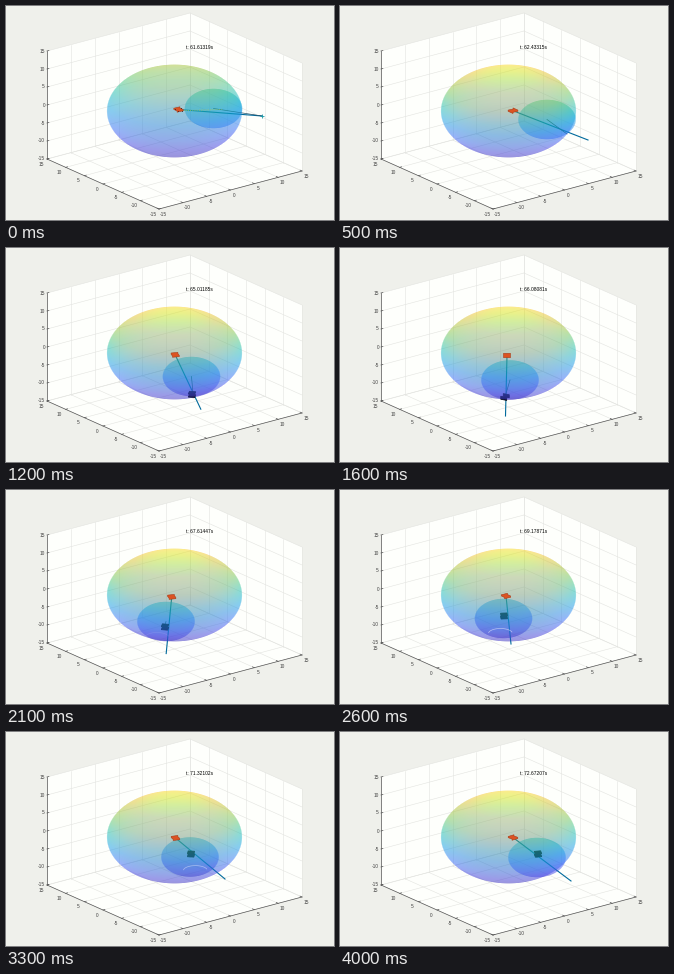
A matplotlib script for the animation above (4100 ms loop, 328 by 214 pixels).

```python
import numpy as np
import matplotlib.pyplot as plt
from matplotlib.animation import FuncAnimation
from matplotlib.colors import LinearSegmentedColormap
from matplotlib.patches import Polygon

W, H, DPI = 328, 214, 100
FRAMES, STEP = 41, 100
CX, CY = 168.5, 105.0        # screen position of the origin
SU, SV = 6.05, 4.164         # pixels per unit across and up
R, R_IN = 11.15, 4.75
ALPHA = 0.31
LIM = 15
COS, SIN = np.cos(np.pi / 6), np.sin(np.pi / 6)

PARULA = LinearSegmentedColormap.from_list("parula", [
    (0.00, (0.242, 0.150, 0.660)), (0.20, (0.281, 0.323, 0.958)),
    (0.33, (0.179, 0.529, 0.968)), (0.48, (0.069, 0.695, 0.839)),
    (0.60, (0.216, 0.784, 0.592)), (0.75, (0.672, 0.779, 0.223)),
    (0.90, (0.997, 0.766, 0.220)), (1.00, (0.977, 0.984, 0.081))])

# Rows of frame, x, y
INNER = np.array([(1, 207.5, 102.5), (5, 207, 113.5), (9, 197, 123.5),
                  (16, 170, 132), (21, 160, 131.5), (26, 163.5, 128.5),
                  (33, 184, 125), (40, 197, 125.5)])
TIP = np.array([(1, 256, 110), (5, 248, 134), (9, 219, 154), (13, 187, 163),
                (16, 165.5, 168), (20, 160, 165), (26, 171, 154),
                (33, 219, 147), (40, 231, 149)])
HUB = np.array([(1, 172.5, 103.5), (5, 173, 104.7), (9, 171, 106),
                (16, 167, 107.5), (26, 166, 106), (33, 169.5, 106),
                (40, 173, 105.5)])
CRAFT = np.array([(8, 275, 128), (9, 228, 137), (11, 197, 144), (16, 165, 149),
                  (21, 159, 137), (26, 164, 126), (33, 185, 122),
                  (40, 198, 122)])
SHORT = np.array([(1, 256, 110), (5, 227, 128), (9, 206, 140), (16, 165, 149),
                  (26, 164, 126), (33, 185, 122), (40, 198, 122)])
YAW = np.array([(1, 0.3), (5, 0.0), (9, 0.35), (16, 0.78), (26, 0.3),
                (33, 0.5), (40, 0.2)])
CLOCK = np.array([(1, 61.613186), (5, 62.433145), (9, 64.084064),
                  (16, 66.080806), (26, 69.178715), (33, 71.321024),
                  (40, 72.672074)])


def spline(keys, k):
    """Smooth value at frame k through the key rows."""
    t, p = keys[:, 0], keys[:, 1:]
    m = np.gradient(p, t, axis=0)
    k = np.clip(k, t[0], t[-1])
    i = min(np.searchsorted(t, k, side="right") - 1, len(t) - 2)
    h = t[i + 1] - t[i]
    s = (k - t[i]) / h
    return ((2*s**3 - 3*s**2 + 1) * p[i] + (s**3 - 2*s**2 + s) * h * m[i]
            + (3*s**2 - 2*s**3) * p[i + 1] + (s**3 - s**2) * h * m[i + 1])


def project(x, y, z):
    return (CX + 4.767*x - 3.733*y, CY - 1.267*x - 1.667*y - 3.6*z)


PX, PY = np.meshgrid(np.arange(W) + 0.5, np.arange(H) + 0.5)
U, V = (PX - CX) / SU, (CY - PY) / SV


def shell(center, radius, top):
    """Back and front half of a see-through sphere as RGBA layers."""
    cu, cv, cd = center
    rho = np.hypot(U - cu, V - cv)
    depth = np.sqrt(np.maximum(radius**2 - rho**2, 0))
    cover = np.clip((radius - rho) * 5 + 0.5, 0, 1) * ALPHA
    halves = []
    for side in (-1, 1):
        z = V * COS + (cd + side * depth) * SIN
        rgba = PARULA(np.clip((z + R) / (top + R), 0, 1))
        rgba[..., 3] = cover
        halves.append(rgba)
    return halves


def over(low, high):
    """Composite one RGBA layer over another."""
    a, b = low[..., 3:], high[..., 3:]
    total = b + a * (1 - b)
    rgb = high[..., :3] * b + low[..., :3] * a * (1 - b)
    return np.concatenate([rgb / np.maximum(total, 1e-6), total], axis=2)


def plate(center, yaw, half, thick):
    """Outline of a small flat square seen from above at a slant."""
    a = yaw + np.arange(4) * np.pi / 2
    x, y = half * np.cos(a), 0.45 * half * np.sin(a)
    pts = np.vstack([np.c_[x, y - thick], np.c_[x, y + thick]])
    order = np.argsort(np.arctan2(pts[:, 1], pts[:, 0]))
    return pts[order] + center


fig = plt.figure(figsize=(W / DPI, H / DPI), dpi=DPI, facecolor="#eff0eb")
ax = fig.add_axes([0, 0, 1, 1])
ax.set_xlim(0, W)
ax.set_ylim(H, 0)
ax.axis("off")


def segment(a, b, **style):
    (x0, y0), (x1, y1) = project(*a), project(*b)
    ax.plot([x0, x1], [y0, y1], **style)


def label(x, y, value, ha="center"):
    ax.text(x, y, str(value), fontsize=3.4, color="#404040", ha=ha,
            va="center", family="Liberation Sans")


def draw_box():
    L = LIM
    outline = [(-L, -L, -L), (L, -L, -L), (L, -L, L), (L, L, L),
               (-L, L, L), (-L, L, -L)]
    ax.add_patch(Polygon([project(*p) for p in outline], fc="#fefffc",
                         ec="none", zorder=0))
    grid = dict(color="#e3e4e0", lw=0.4, zorder=1)
    for t in range(-L, L + 1, 5):
        segment((t, -L, -L), (t, L, -L), **grid)
        segment((t, L, -L), (t, L, L), **grid)
        segment((-L, t, -L), (L, t, -L), **grid)
        segment((L, t, -L), (L, t, L), **grid)
        segment((-L, L, t), (L, L, t), **grid)
        segment((L, -L, t), (L, L, t), **grid)
    edge = dict(color="#555555", lw=0.5, zorder=2)
    segment((-L, -L, -L), (L, -L, -L), **edge)
    segment((-L, -L, -L), (-L, L, -L), **edge)
    segment((-L, L, -L), (-L, L, L), **edge)
    for t in range(-L, L + 1, 5):
        segment((t, -L, -L), (t, -L + 0.5, -L), **edge)
        segment((-L, t, -L), (-L + 0.4, t, -L), **edge)
        segment((-L, L, t), (-L + 0.4, L, t), **edge)
        x, y = project(t, -L, -L)
        label(x + 4, y + 5, t)
        x, y = project(-L, t, -L)
        label(x - 6, y + 5, t)
        x, y = project(-L, L, t)
        label(x - 2, y, t, ha="right")


draw_box()
blank = np.zeros((H, W, 4))
view = dict(extent=(0, W, H, 0), interpolation="nearest", aspect="auto")
behind = ax.imshow(blank, zorder=3, **view)
front = ax.imshow(blank, zorder=6, **view)
trail, = ax.plot([], [], color="#f0f0ff", lw=0.5, zorder=7)
beam, = ax.plot([], [], color="#006a9c", lw=0.8, zorder=5)
short, = ax.plot([], [], color="#20506a", lw=0.5, zorder=5)
glow, = ax.plot([], [], color="#a8c850", lw=0.6, ls=":", zorder=7)
cross, = ax.plot([], [], "+", color="#1a9aa8", ms=2.2, mew=0.6, zorder=7)
craft = Polygon(np.zeros((3, 2)), fc="#0a0f22", ec="#05060f", lw=0.5, zorder=5)
hub = Polygon(np.zeros((3, 2)), fc="#dc5322", ec="#a83c18", lw=0.4, zorder=8)
specks, = ax.plot([], [], ".", color="#3a2020", ms=1.2, mew=0, zorder=9)
ax.add_patch(craft)
ax.add_patch(hub)
clock = ax.text(179.5, 41, "", fontsize=3.5, va="center", color="black",
                family="Liberation Sans", zorder=9)
ax.set_xlim(0, W)
ax.set_ylim(H, 0)


def update(i):
    k = max(i, 1)
    ball, tip, core = spline(INNER, k), spline(TIP, k), spline(HUB, k)
    pod, yaw = spline(CRAFT, k), spline(YAW, k)[0]

    # The small sphere rolls along the inside of the large one
    u, v = (ball[0] - CX) / SU, (CY - ball[1]) / SV
    depth = -np.sqrt(max((R - R_IN)**2 - u*u - v*v, 0))
    top = R + 5.5 * max(0, 1 - (k - 1) / 4)
    big_back, big_front = shell((0, 0, 0), R, top)
    in_back, in_front = shell((u, v, depth), R_IN, top)
    behind.set_data(over(big_back, in_back))
    front.set_data(over(in_front, big_front))

    beam.set_data([core[0], tip[0]], [core[1], tip[1]])
    end = spline(SHORT, k)
    short.set_data([ball[0], end[0]], [ball[1], end[1]])

    early = k < 4
    glow.set_data([core[0] + 5, ball[0] + 8], [core[1] + 1, ball[1] + 1])
    glow.set_visible(early)
    cross.set_data([tip[0]], [tip[1]])
    cross.set_visible(early)
    specks.set_data(core[0] + np.array([-3.5, -1, 2, 3.5]),
                    core[1] + np.array([-1, 1.5, -2, 1]))
    specks.set_visible(early)

    craft.set_xy(plate(pod, yaw + 0.4, 4.6, 1.5))
    craft.set_visible(k >= 8)
    hub.set_xy(plate(core, yaw, 4.9, 0.6))

    a = np.linspace(np.pi * 1.05, np.pi * 1.9, 20)
    trail.set_data(ball[0] - 3 + 12 * np.cos(a) + (k - 26) * 1.2,
                   ball[1] + 15 + 5 * np.sin(a) - (k - 26) * 0.2)
    trail.set_alpha(float(np.interp(k, [20, 25, 33, 37], [0, 0.6, 0.5, 0])))

    clock.set_text(f"t: {spline(CLOCK, k)[0]:.5f}s")
    return behind, front


anim = FuncAnimation(fig, update, frames=FRAMES, interval=STEP, repeat=True,
                     repeat_delay=0, blit=False)
plt.show()
```
